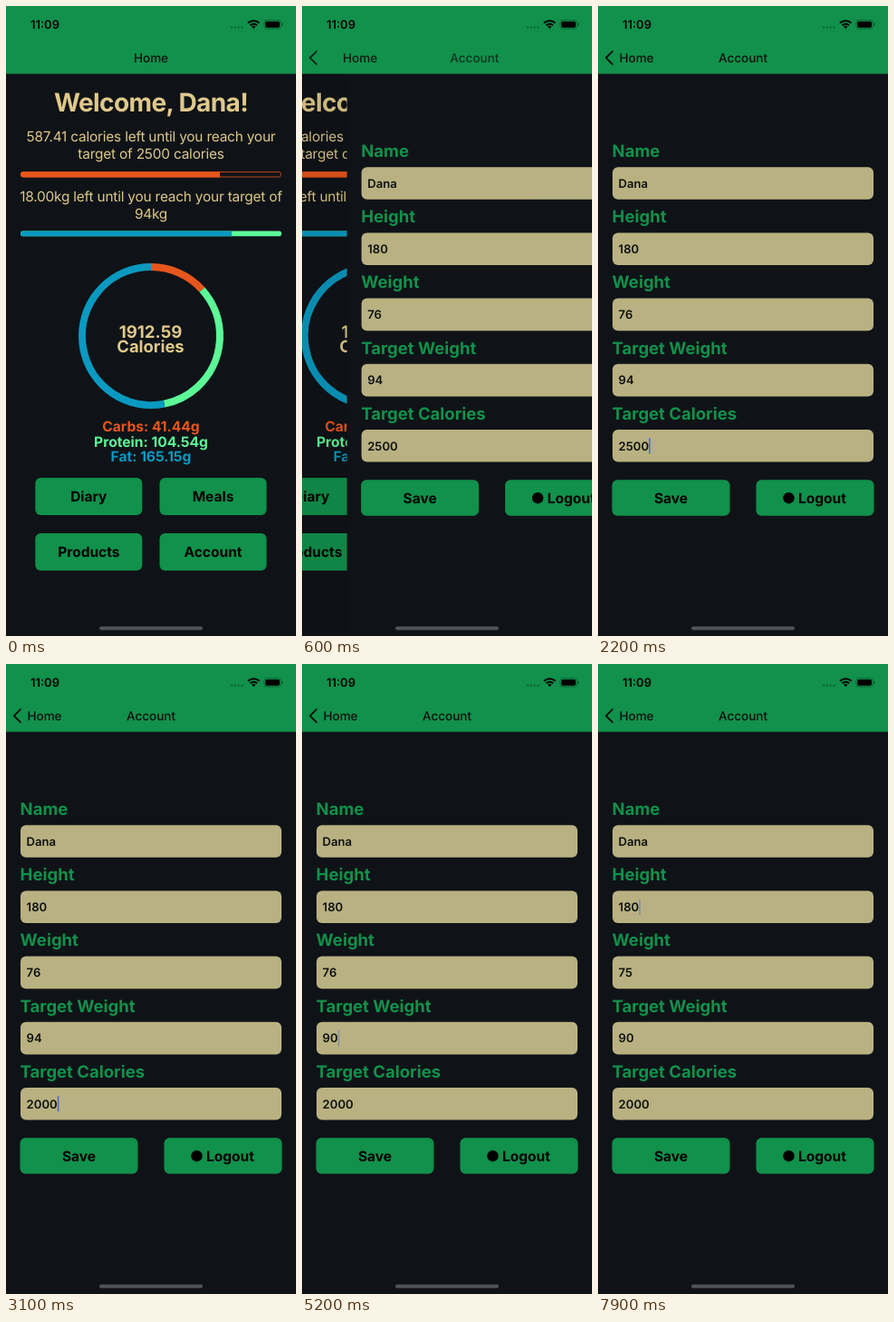
Animation of 320x693 px, one loop 8000 ms. Source, as an HTML page:

```html
<!DOCTYPE html>
<html lang="en">
<head>
<meta charset="utf-8">
<title>Calorie tracker</title>
<style>
  html, body { margin: 0; width: 100%; height: 100%; overflow: hidden; background: #0f1317; }
  svg { display: block; width: 100%; height: 100%; }
  text { font-family: Inter, Roboto, sans-serif; text-rendering: geometricPrecision; white-space: pre; }
</style>
</head>
<body>
<svg id="stage" viewBox="0 0 320 693"></svg>
<script>
const LOOP = 8000, W = 320;
const BG = '#0f1317', GREEN = '#11914b', TAN = '#dfc88b', SAND = '#b9b181', INK = '#0c100f';
const ORANGE = '#e7561c', MINT = '#5cf898', BLUE = '#0a99c0';
const USER = 'Dana';
const stage = document.getElementById('stage');

function el(parent, tag, attrs, text) {
  const node = document.createElementNS('http://www.w3.org/2000/svg', tag);
  for (const key in attrs) node.setAttribute(key, attrs[key]);
  if (text !== undefined) node.textContent = text;
  return parent.appendChild(node);
}
const group = (parent, attrs = {}) => el(parent, 'g', attrs);
const rect = (parent, x, y, width, height, fill, rx = 0) =>
  el(parent, 'rect', { x, y, width, height, fill, rx });
const label = (parent, text, x, y, size, fill, weight = 700, anchor = 'middle', spacing = 0) =>
  el(parent, 'text', {
    x, y, fill, 'font-size': size, 'font-weight': weight,
    'text-anchor': anchor, 'letter-spacing': spacing
  }, text);

function button(parent, text, x, y, width, height) {
  const g = group(parent);
  rect(g, x, y, width, height, GREEN, 6);
  if (text) label(g, text, x + width / 2, y + height / 2 + 5.7, 15.5, '#000');
  return g;
}

// Home page
const home = group(stage);
label(home, `Welcome, ${USER}!`, 160, 115.8, 28, TAN, 700, 'middle', -0.6);
[
  ['587.41 calories left until you reach your', 149],
  ['target of 2500 calories', 168.3],
  ['18.00kg left until you reach your target of', 214.6],
  ['94kg', 234]
].forEach(([text, y]) => label(home, text, 160, y, 15.4, TAN, 400, 'middle', -0.2));

el(home, 'rect', { x: 16.5, y: 182.6, width: 287, height: 5.4, rx: 2.7, fill: 'none', stroke: ORANGE, 'stroke-width': 0.8 });
el(home, 'path', { d: 'M236 182.2H19a3.1 3.1 0 0 0 0 6.2H236Z', fill: ORANGE });
rect(home, 16, 247.6, 288, 5.6, MINT, 2.8);
el(home, 'path', { d: 'M249 247.6H18.8a2.8 2.8 0 0 0 0 5.6H249Z', fill: BLUE });

const macros = [['Carbs', 41.44, ORANGE], ['Protein', 104.54, MINT], ['Fat', 165.15, BLUE]];
const grams = macros.reduce((sum, m) => sum + m[1], 0);
let turn = 0;
macros.forEach(([name, amount, color], i) => {
  const share = amount / grams * 100;
  el(home, 'circle', {
    cx: 160, cy: 363, r: 76, fill: 'none', stroke: color, 'stroke-width': 8, pathLength: 100,
    'stroke-dasharray': `${share} ${100 - share}`, transform: `rotate(${turn * 3.6 - 90} 160 363)`
  });
  turn += share;
  label(home, `${name}: ${amount}g`, 160, 468 + i * 16.5, 15.6, color);
});
label(home, '1912.59', 159.5, 364.6, 18.6, TAN);
label(home, 'Calories', 159.5, 381.2, 18.4, TAN);

const menu = ['Diary', 'Meals', 'Products', 'Account'].map((name, i) =>
  button(home, name, 32.3 + (i % 2) * 137.2, 519 + (i >> 1) * 61, 118, 41));
const accountButton = menu[3];
const dim = rect(stage, 0, 74, W, 619, '#000');

// Account page
const account = group(stage);
rect(account, 0, 74, W, 619, BG);
const initial = [USER, '180', '76', '94', '2500'];
const fieldY = i => 177.2 + i * 72.2;
const fields = ['Name', 'Height', 'Weight', 'Target Weight', 'Target Calories'].map((name, i) => {
  const y = fieldY(i);
  label(account, name, 15.6, y - 11.2, 18.5, GREEN, 700, 'start');
  rect(account, 16, y, 288, 35.6, SAND, 6);
  return label(account, initial[i], 22.6, y + 22.6, 13.1, INK, 600, 'start');
});
button(account, 'Save', 15.5, 521.3, 130, 39.5);
button(account, '', 174.5, 521.3, 130, 39.5);
el(account, 'circle', { cx: 210.5, cy: 541.2, r: 6.2, fill: '#000' });
label(account, 'Logout', 247.5, 546.7, 15.5, '#000');
const caret = rect(account, 0, 0, 1.6, 17.6, '#4a6ddb', 0.6);

// Header and status bar
rect(stage, 0, 0, W, 74.6, GREEN);
const chevron = el(stage, 'path', {
  d: 'M16 49.8L8.8 57L16 64.2', fill: 'none', stroke: INK, 'stroke-width': 1.8,
  'stroke-linecap': 'round', 'stroke-linejoin': 'round'
});
const homeTitle = label(stage, 'Home', 0, 62, 13.5, INK, 500);
const accountTitle = label(stage, 'Account', 0, 62, 13.5, INK, 500);

label(stage, '11:09', 43, 25, 13, '#000', 600);
for (let i = 0; i < 4; i++) rect(stage, 248 + i * 3.8, 22.6, 2.4, 2, 'rgba(0,0,0,.3)', 0.7);
const wifi = group(stage, { fill: 'none', stroke: '#000', 'stroke-width': 2 });
[9, 5.4].forEach(r => {
  const s = r * 0.7;
  el(wifi, 'path', { d: `M${273.3 - s} ${25 - s}A${r} ${r} 0 0 1 ${273.3 + s} ${25 - s}` });
});
el(wifi, 'path', { d: 'M273.3 25L271.1 22.7A3.2 3.2 0 0 1 275.5 22.7Z', fill: '#000', stroke: 'none' });
el(stage, 'rect', { x: 284.9, y: 15.6, width: 18.4, height: 9.4, rx: 2.8, fill: 'none', stroke: '#000', 'stroke-opacity': 0.4, 'stroke-width': 0.8 });
rect(stage, 286.2, 16.9, 15.8, 6.8, '#000', 1.7);
rect(stage, 304.2, 18.7, 1.2, 3.2, 'rgba(0,0,0,.45)', 0.6);
rect(stage, 103, 682.4, 114, 4, '#515356', 2);

// Time, field and its value after a tap or key press
const edits = [
  [1800, 4, '2500'], [2300, 4, '250'], [2400, 4, '25'], [2500, 4, '2'],
  [2700, 4, '20'], [2900, 4, '200'], [3100, 4, '2000'],
  [3900, 3, '94'], [4100, 3, '9'], [4300, 3, '90'],
  [5300, 2, '76'], [5900, 2, '7'], [6300, 2, '75'],
  [7000, 1, '180']
];

const clamp = x => Math.min(1, Math.max(0, x));
const ramp = (t, from, to) => clamp((t - from) / (to - from));
const ease = x => x < 0.5 ? 2 * x * x : 1 - 2 * (1 - x) ** 2;
const shift = (node, x) => node.setAttribute('transform', `translate(${x} 0)`);
const fade = (node, a) => node.setAttribute('opacity', a);

// Critically damped spring for the page push
function push(t) {
  const x = Math.max(0, t - 404) * 0.0169;
  return t > 1100 ? 1 : 1 - (1 + x) * Math.exp(-x);
}

// Solid for half a second after each edit, then blinking
function blink(age) {
  const a = age % 1000;
  const lit = 1 - ramp(a, 450, 580) + ramp(a, 850, 960);
  return age < 450 ? 1 : lit;
}

function draw(t) {
  const p = push(t);
  shift(home, -0.3 * W * p);
  shift(account, W * (1 - p));
  fade(dim, 0.1 * p);
  fade(accountButton, 1 - 0.8 * (ease(ramp(t, 90, 240)) - ease(ramp(t, 420, 670))));

  homeTitle.setAttribute('x', 160 - 117.5 * p ** 1.2);
  fade(homeTitle, 1 - 0.6 * p * (1 - p));
  accountTitle.setAttribute('x', 160 + 196 * (1 - p));
  fade(accountTitle, p * p);
  fade(chevron, p);

  const values = initial.slice();
  let last = null;
  for (const edit of edits) {
    if (edit[0] > t) break;
    last = edit;
    values[edit[1]] = edit[2];
  }
  fields.forEach((field, i) => {
    if (field.textContent !== values[i]) field.textContent = values[i];
  });
  fade(caret, last ? blink(t - last[0]) : 0);
  if (last) {
    caret.setAttribute('x', 22.7 + fields[last[1]].getComputedTextLength());
    caret.setAttribute('y', fieldY(last[1]) + 9);
  }
}

const start = performance.now();
function tick() {
  draw((performance.now() - start) % LOOP);
  requestAnimationFrame(tick);
}
tick();
</script>
</body>
</html>
```
